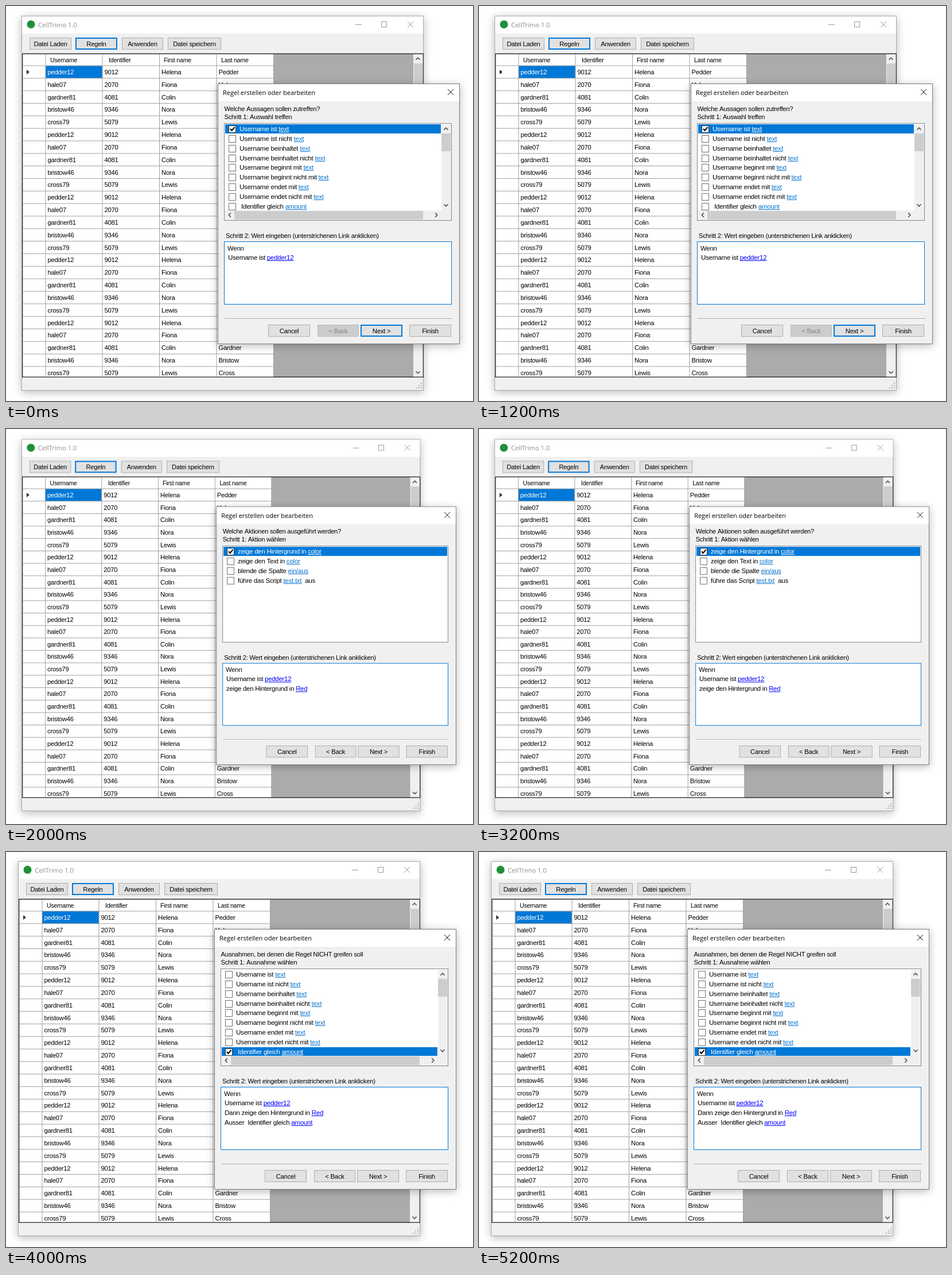
Animation of 814x688 px, one loop 6 s. Source, as an HTML page with a canvas:

```html
<!DOCTYPE html>
<html lang="de">
<head>
<meta charset="utf-8">
<title>Regel-Assistent</title>
<style>
  html, body { margin: 0; width: 100%; height: 100%; overflow: hidden; background: #fff; }
  canvas { display: block; }
</style>
</head>
<body>
<canvas id="stage" width="814" height="688"></canvas>
<script>
const ctx = document.getElementById('stage').getContext('2d');
const BLUE = '#0078d7', FACE = '#f0f0f0', LINE = '#a0a0a0', FRAME = '#333';
const SANS = '"Liberation Sans", Arial, sans-serif';
const TITLE = '"Open Sans", "Noto Sans", sans-serif';

const people = [
  ['pedder12', '9012', 'Helena', 'Pedder'],
  ['hale07', '2070', 'Fiona', 'Hale'],
  ['gardner81', '4081', 'Colin', 'Gardner'],
  ['bristow46', '9346', 'Nora', 'Bristow'],
  ['cross79', '5079', 'Lewis', 'Cross'],
];

// Square brackets mark links.
const conditions = [
  ...['ist', 'ist nicht', 'beinhaltet', 'beinhaltet nicht', 'beginnt mit',
    'beginnt nicht mit', 'endet mit', 'endet nicht mit'].map(verb => `Username ${verb} [text]`),
  ' Identifier gleich [amount]',
];
const actions = [
  'zeige den Hintergrund in [color]',
  'zeige den Text in [color]',
  'blende die Spalte [ein/aus]',
  'führe das Script [test.txt]  aus',
];
const steps = [
  {
    scale: 1, dx: 0, dy: 0, first: true, scroll: true,
    question: 'Welche Aussagen sollen zutreffen?', hint: 'Auswahl treffen',
    items: conditions, checked: 0,
    rule: ['Username ist [pedder12]'],
  },
  {
    scale: 0.992, dx: 0.2, dy: 0.9,
    question: 'Welche Aktionen sollen ausgeführt werden?', hint: 'Aktion wählen',
    items: actions, checked: 0,
    rule: ['Username ist [pedder12]', 'zeige den Hintergrund in [Red]'],
  },
  {
    scale: 1, dx: -6, dy: -1, scroll: true,
    question: 'Ausnahmen, bei denen die Regel NICHT greifen soll', hint: 'Ausnahme wählen',
    items: conditions, checked: 8,
    rule: ['Username ist [pedder12]', 'Dann zeige den Hintergrund in [Red]',
      'Ausser  Identifier gleich [amount]'],
  },
];

let step;
const mapX = x => x * step.scale + step.dx;
const mapY = y => y * step.scale + step.dy;

function rect(x0, y0, x1, y1, color) {
  ctx.fillStyle = color;
  ctx.fillRect(mapX(x0), mapY(y0), (x1 - x0) * step.scale, (y1 - y0) * step.scale);
}

function box(x0, y0, x1, y1, fill, border, weight = 1) {
  rect(x0, y0, x1, y1, border);
  rect(x0 + weight, y0 + weight, x1 - weight, y1 - weight, fill);
}

function trace(points) {
  ctx.beginPath();
  for (const [x, y] of points) ctx.lineTo(mapX(x), mapY(y));
}

function stroke(points, color, width = 1) {
  trace(points);
  ctx.strokeStyle = color;
  ctx.lineWidth = width;
  ctx.stroke();
}

// y is the middle of the capitals; returns the x where the text ends.
function text(string, x, y, size = 11.2, color = '#000', family = SANS, align = 'left') {
  ctx.font = `${size * step.scale}px ${family}`;
  ctx.letterSpacing = family === SANS ? '-0.25px' : '0px';
  ctx.textAlign = align;
  ctx.fillStyle = color;
  ctx.fillText(string, mapX(x), Math.round(mapY(y + 4)));
  return x + ctx.measureText(string).width / step.scale;
}

function richText(string, x, y, size, color, linkColor) {
  string.split(/[[\]]/).forEach((part, i) => {
    const end = text(part, x, y, size, i % 2 ? linkColor : color);
    if (i % 2) rect(x, Math.round(y + 5), end, Math.round(y + 6), linkColor);
    x = end;
  });
}

function button(label, x0, x1, y, state) {
  const [fill, border, ink, weight] = {
    focus: ['#e1e1e1', BLUE, '#000', 2],
    off: ['#cccccc', '#bfbfbf', '#838383', 1],
  }[state] || ['#e1e1e1', '#adadad', '#000', 1];
  box(x0, y, x1, y + 21, fill, border, weight);
  text(label, (x0 + x1) / 2, y + 10.5, 11.3, ink, SANS, 'center');
}

function chevron(x, y, dirX, dirY) {
  const tip = 1.8, wing = 3.6;
  stroke([
    [x - dirX * tip - dirY * wing, y - dirY * tip - dirX * wing],
    [x + dirX * tip, y + dirY * tip],
    [x - dirX * tip + dirY * wing, y - dirY * tip + dirX * wing],
  ], '#505050', 1.6);
}

function cross(x, y, color) {
  stroke([[x - 5, y - 5], [x + 5, y + 5]], color);
  stroke([[x + 5, y - 5], [x - 5, y + 5]], color);
}

function panel(x0, y0, x1, y1, border) {
  ctx.shadowColor = 'rgba(0,0,0,.28)';
  ctx.shadowBlur = 14;
  ctx.shadowOffsetY = 3;
  rect(x0, y0, x1, y1, border);
  ctx.shadowColor = 'transparent';
  rect(x0 + 1, y0 + 1, x1 - 1, y1 - 1, FACE);
  rect(x0 + 1, y0 + 1, x1 - 1, y0 + 31, '#fff');
}

function drawTable() {
  const columns = [69, 168, 267.5, 367], rowHeight = 21.83, top = 104;
  box(28, 82.5, 728, 647, '#ababab', FRAME, 1.5);
  rect(29.5, 84, 466, 645.5, '#fff');
  ['Username', 'Identifier', 'First name', 'Last name'].forEach((label, i) =>
    text(label, [77, 179, 275, 375][i], 94, 10.7));
  rect(69, top, 168, top + rowHeight, BLUE);

  for (let row = 0; row < 25; row++) {
    const y = top + row * rowHeight;
    rect(29.5, y - 0.5, 467, y + 0.5, LINE);
    people[row % people.length].forEach((value, i) =>
      text(value, columns[i] + 3.5, y + 11, 11.3, row || i ? '#000' : '#fff'));
  }
  for (const x of [...columns, 466.5]) rect(x - 0.5, 84, x + 0.5, 645.5, LINE);

  trace([[36, 111], [41, 115], [36, 119]]);
  ctx.fillStyle = FRAME;
  ctx.fill();

  rect(710, 84, 726.5, 645.5, FACE);
  rect(711, 100, 726, 160, '#cdcdcd');
  chevron(718, 92, 0, -1);
  chevron(718, 638, 0, 1);
}

function drawMainWindow() {
  panel(27, 17, 728, 670, '#a8a8a8');
  ctx.beginPath();
  ctx.arc(mapX(43.5), mapY(32), 7, 0, 7);
  ctx.fillStyle = '#1f8f3c';
  ctx.fill();
  text('CellTrimo 1.0', 56, 32.5, 11.2, '#8c8c8c', TITLE);
  rect(609, 32, 620, 33, '#999');
  box(654, 27, 664, 37, '#fff', '#999');
  cross(705, 32, '#999');

  button('Datei Laden', 41, 114, 55);
  button('Regeln', 121, 194, 55, 'focus');
  button('Anwenden', 202, 274, 55);
  button('Datei speichern', 282, 375, 55);
  drawTable();

  for (let i = 0; i < 3; i++)
    for (let j = 0; j <= i; j++)
      rect(723 - j * 4, 656 + i * 4, 725 - j * 4, 658 + i * 4, '#b0b0b0');
}

function drawList() {
  box(380, 204, 777, 374, '#fff', '#828790');
  ctx.save();
  ctx.beginPath();
  ctx.rect(0, 0, 814, mapY(step.scroll ? 356 : 373));
  ctx.clip();
  step.items.forEach((item, i) => {
    const y = Math.round(214 + i * 16.87), checked = i === step.checked;
    if (checked) rect(382, y - 8, step.scroll ? 758 : 775, y + 8, BLUE);
    box(388, y - 6, 401, y + 7, '#fff', checked ? '#333' : '#707070');
    if (checked) stroke([[391, y], [393.5, y + 3], [398.5, y - 3]], '#000', 2);
    richText(item, 407, y, 11.6, checked ? '#fff' : '#000', checked ? '#fff' : '#0a74cf');
  });
  ctx.restore();
  if (!step.scroll) return;

  rect(759, 206, 776, 373, FACE);
  rect(381, 356, 776, 373, FACE);
  rect(759, 222, 775, 253, '#cdcdcd');
  rect(398, 357, 727, 372, '#cdcdcd');
  chevron(767, 214, 0, -1);
  chevron(767, 347, 0, 1);
  chevron(390, 364, -1, 0);
  chevron(750, 364, 1, 0);
}

function drawDialog() {
  panel(369, 135, 791, 589, '#7a7a7a');
  text('Regel erstellen oder bearbeiten', 378, 151, 11, '#000', TITLE);
  cross(775, 150, '#111');
  text(step.question, 380.5, 179);
  text('Schritt 1: ' + step.hint, 380.5, 193);
  drawList();

  text('Schritt 2: Wert eingeben (unterstrichenen Link anklicken)', 383, 400);
  box(380, 410, 777, 520, '#fff', BLUE);
  text('Wenn', 386, 422, 11.4);
  step.rule.forEach((line, i) => richText(line, 387, 438 + i * 17, 11.5, '#000', '#0000ff'));

  rect(381, 544, 778, 545, LINE);
  rect(381, 545, 778, 546, '#fff');
  button('Cancel', 457, 530, 555);
  button('< Back', 543, 615, 555, step.first && 'off');
  button('Next >', 618, 691, 555, step.first && 'focus');
  button('Finish', 703, 776, 555);
}

function draw() {
  step = steps[Math.floor(performance.now() % 6000 / 2000)];
  ctx.fillStyle = '#fff';
  ctx.fillRect(0, 0, 814, 688);
  drawMainWindow();
  drawDialog();
  requestAnimationFrame(draw);
}
draw();
</script>
</body>
</html>
```
